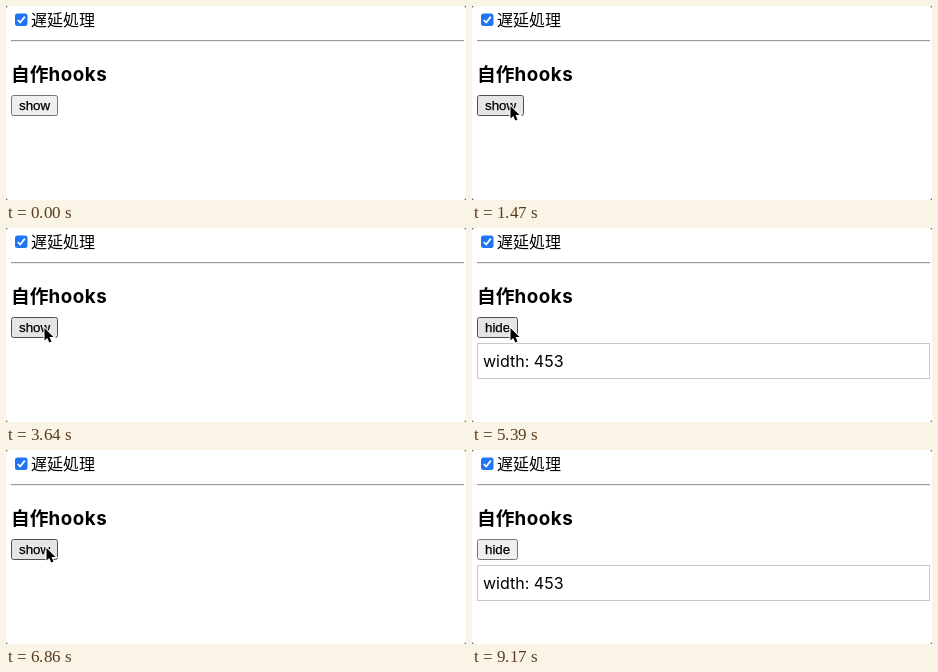
These frames come from a looping animation (460 by 194 pixels, 9.66 s). An HTML page:

```html
<!DOCTYPE html>
<html lang="ja">
<head>
<meta charset="utf-8">
<style>
  html, body { margin: 0; height: 100%; overflow: hidden; background: #fff; }
  svg { display: block; }
  text { font: 16px Inter, "Noto Sans CJK JP", "Noto Sans CJK", sans-serif; }
  .title { font-size: 18.72px; font-weight: bold; }
  #label { font: 13.333px "Liberation Sans", Arial, sans-serif; stroke: #000; stroke-width: .25; }
</style>
</head>
<body>
<svg width="460" height="194" viewBox="0 0 460 194">
  <path d="M0 0H2L0 2ZM460 0V2L458 0ZM0 194V192L2 194ZM460 194H458L460 192Z" fill="#777"/>

  <rect x="9" y="7.5" width="12.5" height="12.5" rx="2.5" fill="#1f75f5"/>
  <path d="M11.8 14L14.2 16.5L18.8 10.6" fill="none" stroke="#fff" stroke-width="1.8"/>
  <text x="25" y="20">遅延処理</text>

  <rect x="5" y="34" width="453" height="1" fill="#9a9a9a"/>
  <rect x="5" y="35" width="453" height="1" fill="#eee"/>
  <text class="title" x="5" y="75">自作<tspan letter-spacing=".6">hooks</tspan></text>

  <rect id="button" x="5.5" y="89.5" height="20" rx="2"/>
  <text id="label" x="13" y="104"></text>

  <g id="panel">
    <rect x="5.5" y="115.5" width="452" height="35" fill="#fff" stroke="#c8c8c8"/>
    <text x="11" y="139">width: 453</text>
  </g>

  <circle id="ring" r="21" cy="1.5" fill="none" stroke="#333" stroke-width="2"/>
  <path id="cursor" d="M.5 1V13.5L3.3 10.9L5.3 15.6L7.5 14.6L5.5 10.1H9.5Z"
        stroke="#fff" stroke-width="2" paint-order="stroke"/>
</svg>
<script>
const LOOP = 9660, TICK = 70;
const OUTSIDE = { x: 195, y: 196 };
const $ = id => document.getElementById(id);

// Pointer moves: start time, length in ticks, destination
const moves = [
  { at: 420, ticks: 3, x: 133, y: 163 },
  { at: 770, ticks: 4, x: 38, y: 99 },
  { at: 5600, ticks: 4, x: 72, y: 126 },
  { at: 6160, ticks: 5, x: 40, y: 97 },
  { at: 8470, ticks: 3, x: 77, y: 124 },
  { at: 8890, ticks: 5, ...OUTSIDE },
];

// The first click only focuses the window; each later one toggles the panel when done
const clicks = [
  { press: 1260, release: 1330, done: 1470 },
  { press: 1750, release: 1820, done: 2240 },
  { press: 3500, release: 3570, done: 3640 },
  { press: 4830, release: 4970, done: 5390 },
  { press: 6720, release: 6790, done: 6860 },
  { press: 7560, release: 7700, done: 8190 },
];

const ease = p => p * p * (3 - 2 * p);
const show = (id, on) => $(id).setAttribute("visibility", on ? "visible" : "hidden");

function pointerAt(t) {
  let { x, y } = OUTSIDE;
  for (const move of moves) {
    if (t < move.at) break;
    const step = Math.floor((t - move.at) / TICK) + 1;
    const p = ease(Math.min(1, step / move.ticks));
    x += (move.x - x) * p;
    y += (move.y - y) * p;
  }
  return { x, y };
}

function draw() {
  const t = performance.now() % LOOP;
  const { x, y } = pointerAt(t);
  const done = clicks.filter(click => t >= click.done).length;
  const focused = done > 0;
  const open = focused && done % 2 === 0;
  const width = open ? 40 : 46;

  const hover = focused && x < 6 + width && y >= 89 && y < 110;
  const pressed = focused && clicks.some(c => t >= c.press && t < c.done);
  const [fill, stroke] = pressed ? ["#f5f5f5", "#8d8d8d"]
    : hover ? ["#e5e5e5", "#4f4f4f"] : ["#efefef", "#767676"];
  const button = $("button");
  button.setAttribute("width", width);
  button.setAttribute("fill", fill);
  button.setAttribute("stroke", stroke);
  $("label").textContent = open ? "hide" : "show";

  show("panel", open);
  show("ring", clicks.some(c => t >= c.press && t < c.release));
  for (const id of ["ring", "cursor"]) $(id).setAttribute("transform", `translate(${x} ${y})`);
  requestAnimationFrame(draw);
}
draw();
</script>
</body>
</html>
```
